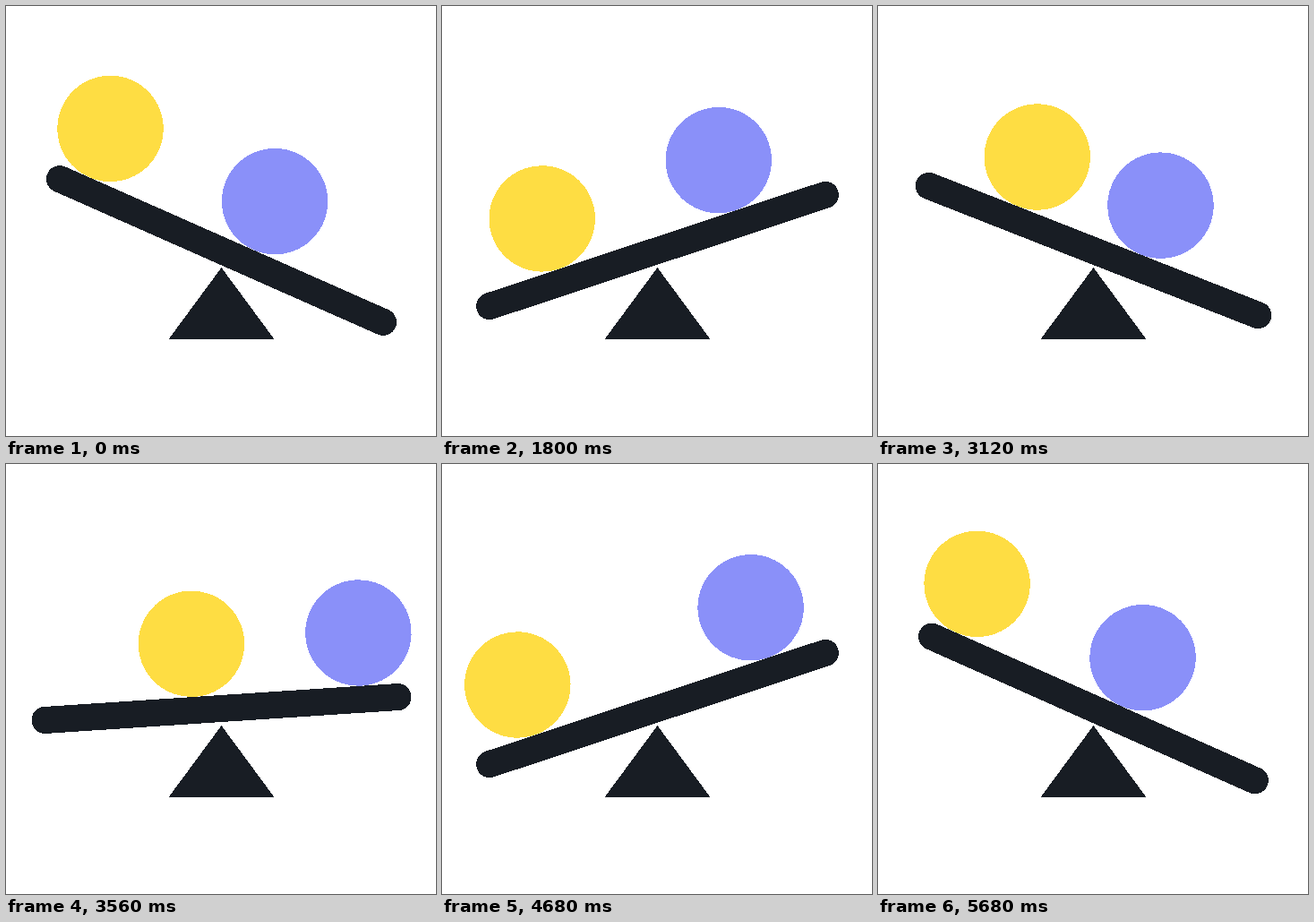
Recreate the animation shown at these times as an HTML page. Size 480 by 480 pixels, loop 5720 ms.

```html
<!DOCTYPE html>
<html lang="en">
<head>
<meta charset="utf-8">
<title>Seesaw</title>
<style>
  html, body { margin: 0; width: 100%; height: 100%; overflow: hidden; background: #fff; }
  svg { display: block; width: 100vw; height: 100vh; shape-rendering: crispEdges; }
  .dark { fill: #181d24; }
</style>
</head>
<body>
<svg viewBox="0 0 480 480">
  <polygon class="dark" points="240.5,292 299.5,372 181.5,372"/>
  <g id="seesaw">
    <circle id="yellow" cy="-74.3" r="59.2" fill="#fedd43"/>
    <circle id="blue" cy="-74.3" r="59.2" fill="#8a90f9"/>
    <rect class="dark" x="-212.4" y="-15" width="424.8" height="30" rx="15"/>
  </g>
</svg>
<script>
const LOOP = 5720, STEP = 40, LEAD = 80;
const CYCLE = 5760, SWING = 1440, TILT = 24;

// Each ball rolls between two spots on the beam; a move is [start, end] in ms.
const balls = [
  { id: "yellow", low: -185, high: -25,
    moves: [[-338, 1100], [1195, 2530], [2500, 3850], [3914, 5360]] },
  { id: "blue", low: 22, high: 185,
    moves: [[-235, 1085], [1110, 2605], [2672, 4152], [4187, 5525]] }
];
for (const ball of balls) ball.node = document.getElementById(ball.id);
const seesaw = document.getElementById("seesaw");

// cubic-bezier(.65, 0, .35, 1)
function ease(x) {
  if (x <= 0) return 0;
  if (x >= 1) return 1;
  let a = 0, b = 1, u;
  for (let i = 0; i < 24; i++) {
    u = (a + b) / 2;
    const v = 1 - u;
    const bx = 1.95 * u * v * v + 1.05 * u * u * v + u * u * u;
    if (bx < x) a = u; else b = u;
  }
  return u * u * (3 - 2 * u);
}

function tilt(t) {
  const dir = Math.floor(t / SWING) % 2 ? -1 : 1;
  return dir * TILT * (1 - 2 * ease((t % SWING) / SWING));
}

function place(ball, t) {
  const first = ball.moves[0][0] + CYCLE;
  if (t >= first) t -= CYCLE;
  let i = ball.moves.length - 1;
  while (i > 0 && t < ball.moves[i][0]) i--;
  const [start, end] = ball.moves[i];
  const p = ease((t - start) / (end - start));
  return ball.low + (ball.high - ball.low) * (i % 2 ? 1 - p : p);
}

function draw(ms) {
  const t = Math.floor(((ms + 4) % LOOP) / STEP) * STEP + LEAD;
  seesaw.setAttribute("transform", `translate(240.5 273) rotate(${tilt(t)})`);
  for (const ball of balls) ball.node.setAttribute("cx", place(ball, t));
}

const begin = performance.now();
function tick() {
  draw(performance.now() - begin);
  requestAnimationFrame(tick);
}
tick();
</script>
</body>
</html>
```
